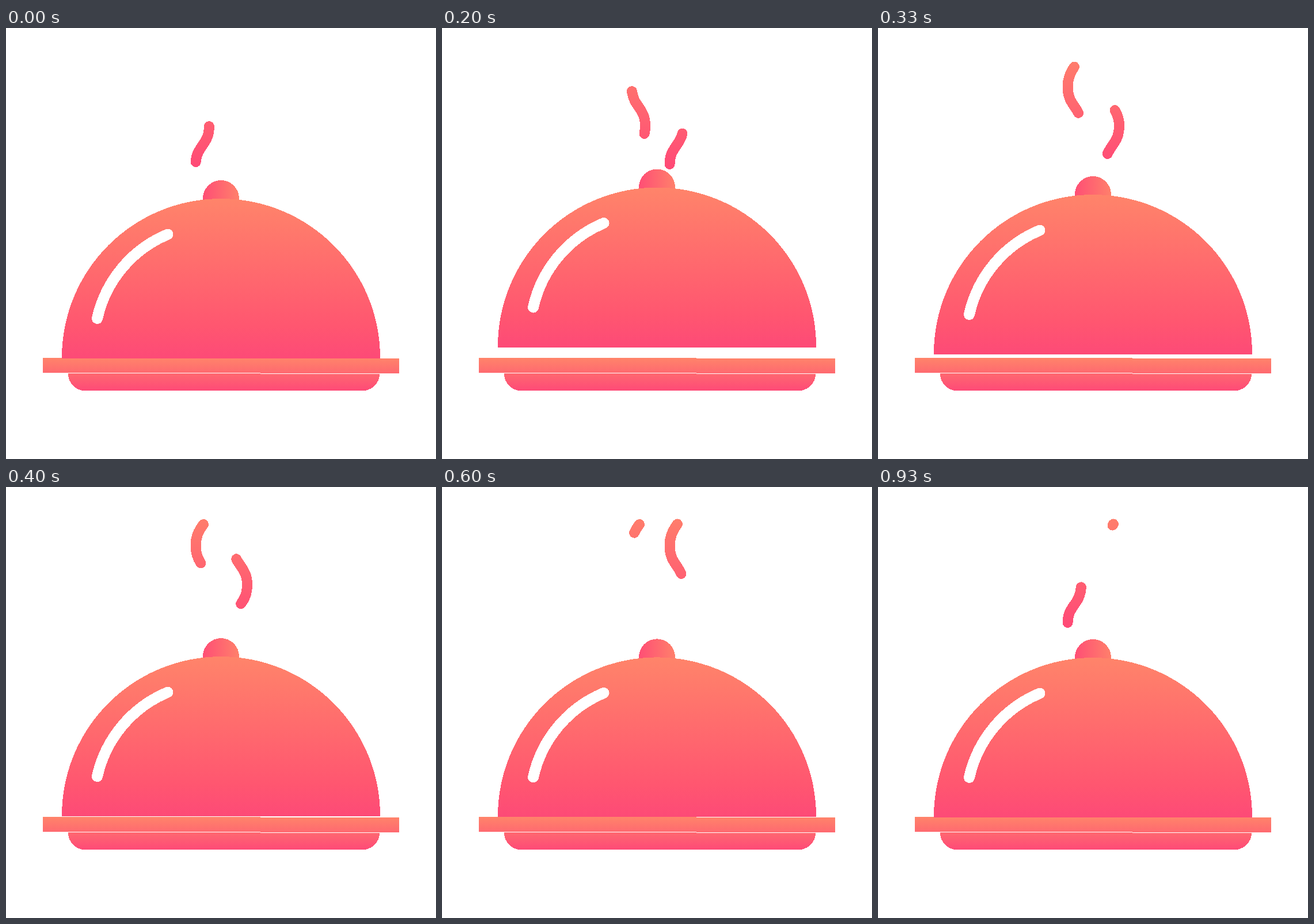
These frames come from a looping animation (747 px wide and 750 px high, 0.96 s). An HTML page:

```html
<!DOCTYPE html>
<html lang="en">
<head>
<meta charset="utf-8">
<title>Steaming dish</title>
<style>
  html, body { margin: 0; width: 100%; height: 100%; overflow: hidden; background: #fff; }
  svg { display: block; width: 100%; height: 100%; }
  .steam { fill: none; stroke: url(#steamFill); stroke-width: 18; stroke-linecap: round; }
</style>
</head>
<body>
<svg viewBox="0 0 747 750" shape-rendering="crispEdges">
  <defs>
    <linearGradient id="steamFill" gradientUnits="userSpaceOnUse" x1="0" y1="45" x2="0" y2="240">
      <stop offset="0" stop-color="#ff806b"/>
      <stop offset="1" stop-color="#ff4a76"/>
    </linearGradient>
    <linearGradient id="knobFill">
      <stop offset="0" stop-color="#ff4e75"/>
      <stop offset="1" stop-color="#ff806b"/>
    </linearGradient>
    <linearGradient id="domeFill" x2="0" y2="1">
      <stop offset="0" stop-color="#ff846a"/>
      <stop offset=".8" stop-color="#ff5670"/>
      <stop offset="1" stop-color="#fd4a77"/>
    </linearGradient>
    <linearGradient id="trayFill" gradientUnits="userSpaceOnUse" x1="0" y1="574" x2="0" y2="631">
      <stop offset="0" stop-color="#ff846a"/>
      <stop offset="1" stop-color="#fe4a77"/>
    </linearGradient>
  </defs>
  <rect width="747" height="750" fill="#fff"/>
  <path class="steam" id="left" d="M329.5 237C329.5 205 353 205 353 170C353 137 329.5 137 329.5 102C329.5 87 335 75 343 65"/>
  <path class="steam" id="right" d="M395.5 237C395.5 205 419 205 419 170C419 137 395.5 137 395.5 102C395.5 87 401 75 409 64.5"/>
  <g fill="url(#trayFill)">
    <path d="M63.5 574H442V575H683V601H442V600H63.5Z"/>
    <path d="M108 601H442V602H649A30 29.3 0 0 1 618 631.3H139A30 29.3 0 0 1 108 602Z"/>
  </g>
  <g id="lid">
    <path fill="url(#knobFill)" d="M342 301V296.5A31.5 31.5 0 0 1 405 296.5V301Z"/>
    <path fill="url(#domeFill)" d="M97 575V573.5A276.5 276.5 0 0 1 650 573.5V575Z"/>
    <path fill="none" stroke="#fff" stroke-width="19" stroke-linecap="round" d="M281 359A208 208 0 0 0 158.5 505.5"/>
  </g>
</svg>
<script>
const LOOP = 960, FRAME = 1000 / 30;
const CYCLE = 28.3;   // frames between two puffs of one strand
const TRAVEL = 20.3;  // frames the lower end takes to reach the top
const $ = id => document.getElementById(id);
const clamp = u => Math.min(1, Math.max(0, u));

// The upper end leaves at frame `start` and takes `rise` frames; the lower end follows after `delay`
function strand(id, start, rise, delay) {
  const path = $(id), total = path.getTotalLength();
  return f => {
    const age = (f - start + CYCLE) % CYCLE;
    const head = total * clamp(age / rise) ** 1.05;
    const tail = total * clamp((age - delay) / TRAVEL);
    const len = head - tail;
    path.style.visibility = len > 0.3 ? 'visible' : 'hidden';
    path.setAttribute('stroke-dasharray', `${Math.max(len, 0.01)} 999`);
    path.setAttribute('stroke-dashoffset', -tail);
  };
}

// The lid pops up, then drops and bounces to rest
function lift(f) {
  const peak = 5, bounce = 0.43;
  let height = 20, half = 6.2, t = f - peak;
  if (t < 0) return height * (1 - (-t / peak) ** 2.7);
  while (t > half && height > 0.2) {
    t -= half * (1 + bounce);
    half *= bounce;
    height *= bounce * bounce;
  }
  return height * Math.max(0, 1 - (t / half) ** 2);
}

const strands = [strand('left', 21.4, 17.2, 6.5), strand('right', 0, 18, 8)];
const lid = $('lid');

function draw(ms) {
  const f = Math.floor((ms % LOOP + 3.4) / FRAME);
  strands.forEach(s => s(f));
  lid.setAttribute('transform', `translate(0 ${-lift(f)})`);
}

const start = performance.now();
function tick() {
  draw(performance.now() - start);
  requestAnimationFrame(tick);
}
tick();
</script>
</body>
</html>
```
